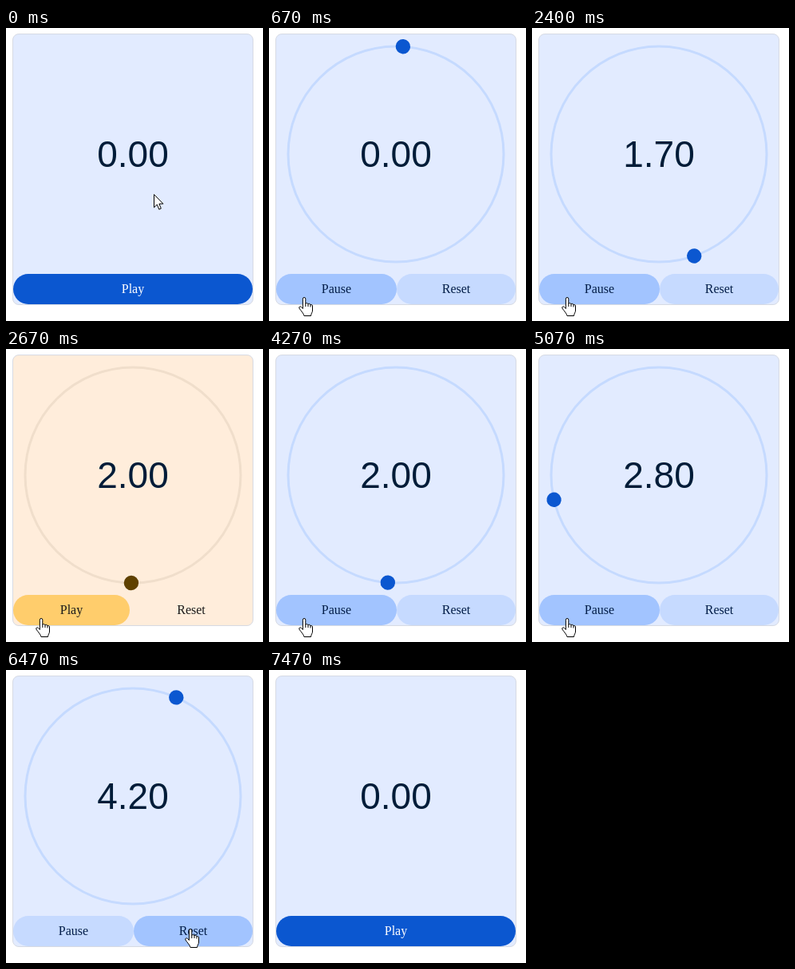
Animation, 322 px wide and 367 px high, one loop 7.94 s. Source, as an HTML page:

```html
<!DOCTYPE html>
<html lang="en">
<head>
<meta charset="utf-8">
<title>Stopwatch</title>
<style>
  html, body { margin: 0; width: 100%; height: 100%; overflow: hidden; background: #fff; }
  svg { display: block; width: 100%; height: 100%; }
  text { text-anchor: middle; }

  .card { fill: #e2ebff; stroke: #d6dae3; }
  .ring { fill: none; stroke: #c5daff; stroke-width: 3; }
  .dot { fill: #0b57d0; }
  .count { font: 46px "Liberation Sans", Arial, sans-serif; fill: #001c38; }
  .label { font: 16px "Liberation Serif", "Times New Roman", serif; fill: #041e49; }
  .btn { fill: #c6daff; }
  .btn.hover { fill: #a2c4ff; }

  .idle .btn { fill: #0b57d0; }
  .idle .label { fill: #fff; }
  .idle .ring, .idle .dot, .idle .reset { display: none; }

  .paused .card { fill: #ffeddb; }
  .paused .ring { stroke: #f0decb; }
  .paused .dot { fill: #5f4100; }
  .paused .label { fill: #1b1b1b; }
  .paused .btn { fill: none; }
  .paused .btn.hover { fill: #ffcd6c; }

  .pointer path { fill: #fff; stroke: #000; stroke-linejoin: round; }
  .pointer .folds { fill: none; }
</style>
</head>
<body>
<svg id="stage" viewBox="0 0 322 367">
  <rect class="card" x="8.5" y="7.5" width="301" height="339" rx="7.5"/>
  <circle class="ring" cx="159" cy="158" r="135"/>
  <circle class="dot" id="dot" cx="159" cy="23" r="9.2"/>
  <text class="count" id="count" x="159" y="174">0.00</text>
  <g id="main">
    <rect class="btn" x="9" y="308" height="38" rx="19"/>
    <text class="label" y="332"></text>
  </g>
  <g id="reset" class="reset">
    <rect class="btn" y="308" height="38" rx="19"/>
    <text class="label" y="332">Reset</text>
  </g>
  <g id="pointer" class="pointer">
    <path id="arrow" d="M.5 .5V16.8L4.3 13.2L6.8 19.2L9.3 18.1L6.9 12.2H11.9Z"/>
    <g id="hand" transform="translate(-7)">
      <path d="M5.4 14.5V2.2a1.7 1.7 0 0 1 3.4 0V8.6C9.2 7 11.9 7.4 12 9C12.6 7.8 15 8.2 15 10C15.8 9 17.5 9.6 17.5 11V17C17.5 19.5 15.8 20 15.5 23.5H7C6.6 20.5 3 17.5 .9 14C.2 12.5 2 11 3.4 12.3Z"/>
      <path class="folds" d="M8.8 8.5V12M12 9V12M15 10V12.5"/>
    </g>
  </g>
</svg>
<script>
  const LOOP = 7940;
  const FPS = 15;
  const RATE = 1.007;
  const START = 666.7, PAUSE = 2666.7, RESUME = 4266.7, RESET = 6800, GONE = 7466;

  const $ = id => document.getElementById(id);
  const stage = $('stage'), dot = $('dot'), count = $('count');
  const pointer = $('pointer'), arrow = $('arrow'), hand = $('hand');

  // Pointer moves: begin, end, x, y
  const home = [185, 208];
  const moves = [
    [0, 333, 39, 343],
    [333, 400, 44, 337],
    [5560, 6260, 231, 324],
    [7200, 7467, 102, 357]
  ];

  const ease = p => p * p * (3 - 2 * p);
  const show = (el, on) => el.setAttribute('display', on ? 'inline' : 'none');

  function pointerAt(ms) {
    let [x, y] = home;
    for (const [from, to, tx, ty] of moves) {
      if (ms <= from) break;
      const p = ease(Math.min(1, (ms - from) / (to - from)));
      x += (tx - x) * p;
      y += (ty - y) * p;
    }
    return [Math.round(x), Math.round(y)];
  }

  function modeAt(ms) {
    if (ms < START - 1 || ms > RESET - 1) return 'idle';
    return ms > PAUSE - 1 && ms < RESUME - 1 ? 'paused' : 'running';
  }

  function elapsedAt(ms, mode) {
    if (mode === 'idle') return 0;
    if (mode === 'paused') return 2.01;
    return ms < PAUSE
      ? 0.042 + (ms - START) / 1000 * RATE
      : 2.048 + (ms - RESUME) / 1000 * RATE;
  }

  function setButton(id, left, right, text, hover) {
    const [rect, label] = $(id).children;
    rect.setAttribute('x', left);
    rect.setAttribute('width', right - left);
    rect.classList.toggle('hover', hover);
    label.setAttribute('x', (left + right) / 2);
    label.textContent = text;
  }

  function render(t) {
    const step = Math.floor((t + 5) * FPS / 1000);
    const ms = step * 1000 / FPS;
    const mode = modeAt(ms);
    const secs = elapsedAt(ms, mode);
    const [x, y] = pointerAt(ms);
    const over = y >= 308 && y < 346;
    const split = { idle: 309, paused: 155, running: 160 }[mode];

    stage.setAttribute('class', mode);
    dot.setAttribute('transform', `rotate(${secs * 90} 159 158)`);
    count.textContent = (Math.floor(secs * 10) / 10).toFixed(2);
    setButton('main', 9, split, mode === 'running' ? 'Pause' : 'Play', over && x < split);
    setButton('reset', split, 309, 'Reset', over && x >= split);

    pointer.setAttribute('transform', `translate(${x} ${y})`);
    show(pointer, ms < GONE);
    show(hand, over);
    show(arrow, !over);
  }

  const begin = performance.now();
  function tick() {
    render((performance.now() - begin) % LOOP);
    requestAnimationFrame(tick);
  }
  tick();
</script>
</body>
</html>
```
